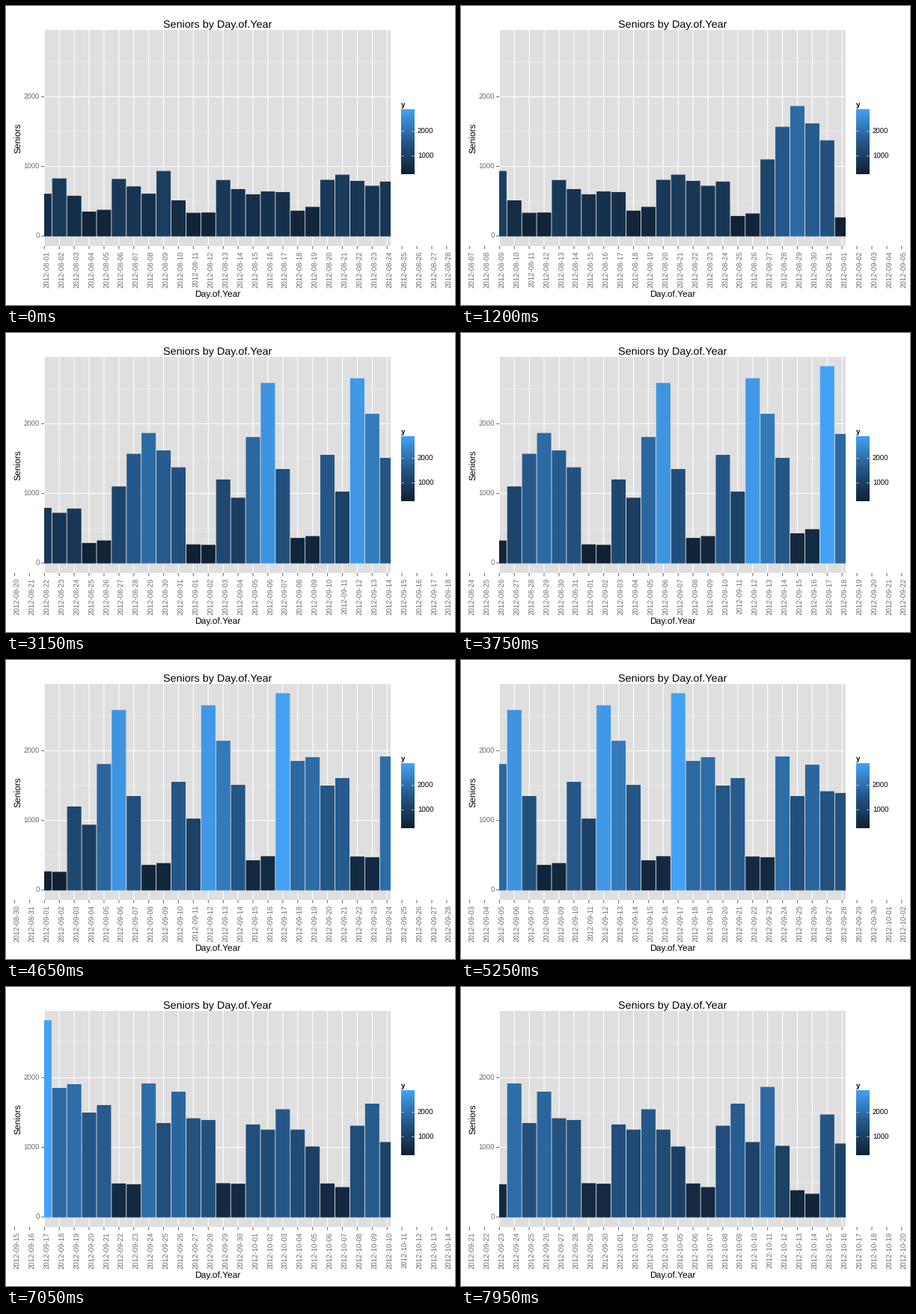
Animation of 600x400 px, one loop 8000 ms. Source, as a matplotlib script:

```python
import matplotlib.pyplot as plt
import numpy as np
from matplotlib.animation import FuncAnimation
from matplotlib.colors import LinearSegmentedColormap, Normalize
from matplotlib.patches import Rectangle

plt.rcParams.update({"font.family": "Liberation Sans", "text.hinting": "none"})

W, H, DPI = 600, 400, 100
PX = 72 / DPI                                 # points per pixel
LEFT, RIGHT, TOP, BOTTOM = 51.3, 514, 32, 321
ZERO, UNIT = 307.8, 0.0932                    # baseline and pixels per senior
STEP = 19.91                                  # pixels per day
VISIBLE, BEFORE, AFTER = 24, 2, 27            # bars shown, labels either side
FRAMES, INTERVAL, FRAMES_PER_DAY = 160, 50, 3
GREY, PANEL = "#6d6d6d", "#dfdfdf"

COUNTS = [
    602, 822, 573, 346, 372, 814, 707, 603, 929, 507, 329, 332, 799, 669, 594,
    635, 626, 359, 414, 802, 876, 787, 716, 777, 283, 319, 1094, 1563, 1862,
    1611, 1369,
    263, 256, 1194, 932, 1803, 2580, 1344, 355, 382, 1548, 1020, 2647, 2137,
    1504, 422, 481, 2820, 1848, 1902, 1494, 1602, 477, 466, 1912, 1344, 1794,
    1413, 1388, 481, 473,
    1324, 1250, 1542, 1250, 1007, 477, 425, 1306, 1622, 1071, 1863, 1017, 380,
    329, 1467, 1050,
]
DATES = np.datetime64("2012-08-01") + np.arange(len(COUNTS) + AFTER)
BLUES = LinearSegmentedColormap.from_list("blues", ["#102134", "#245788", "#44a2f5"])
scale = Normalize(min(COUNTS), max(COUNTS))

fig = plt.figure(figsize=(W / DPI, H / DPI), dpi=DPI, facecolor="white")
ax = fig.add_axes([0, 0, 1, 1])


def line(xs, ys, color, width=1.07, **kw):
    return ax.plot(xs, ys, color=color, lw=width * PX, snap=False,
                   solid_capstyle="butt", **kw)[0]


def text(x, y, s, size=9.6, color="black", **kw):
    return ax.text(x, y, s, fontsize=size * PX, color=color, va="baseline",
                   rotation_mode="anchor", **kw)


def y_pos(value):
    return ZERO - value * UNIT


# Panel and grid
panel = ax.add_patch(Rectangle((LEFT, TOP), RIGHT - LEFT, BOTTOM - TOP,
                               fc=PANEL, lw=0, snap=False, zorder=0))
for value in (500, 1500, 2500):
    line([LEFT, RIGHT], [y_pos(value)] * 2, "#efefef", 0.53, zorder=1)
for value in (0, 1000, 2000):
    y = y_pos(value)
    line([LEFT, RIGHT], [y, y], "white", zorder=1)
    line([LEFT - 4.3, LEFT], [y, y], GREY)
    text(44.6, y + 3.5, str(value), color=GREY, ha="right")
for k in range(VISIBLE):
    x = LEFT + k * STEP
    line([x, x], [TOP, BOTTOM], "white", zorder=1).set_clip_path(panel)

# Bars
bars = []
for k in range(VISIBLE):
    bar = Rectangle((LEFT + (k - 0.45) * STEP, ZERO), 0.9 * STEP, 0,
                    lw=1.07 * PX, joinstyle="round", snap=False, zorder=2)
    ax.add_patch(bar).set_clip_path(panel)
    bars.append(bar)

# Day ticks and labels
days = []
for offset in range(-BEFORE, AFTER + 1):
    x = LEFT + offset * STEP
    tick = line([x, x], [BOTTOM, BOTTOM + 4.3], GREY)
    label = text(x + 7, 327.8, "", color=GREY, rotation=90, ha="right")
    days.append((offset, tick, label))

# Titles
text(282.6, 28.7, "Seniors by Day.of.Year", 14.4, ha="center")
text(282.6, 390, "Day.of.Year", 12, ha="center")
text(19.5, 176.7, "Seniors", 12, rotation=90, ha="center")

# Colour key
KEY_L, KEY_R, KEY_T, KEY_B = 528.3, 545.6, 138.8, 225.2
ax.imshow(np.linspace(1, 0, 256)[:, None], cmap=BLUES, aspect="auto",
          extent=(KEY_L, KEY_R, KEY_B, KEY_T), interpolation="bilinear")
text(528, 134.8, "y", weight="bold")
for value, y in ((2000, 167.8), (1000, 200.5)):
    for x in (KEY_L, KEY_R - 3.5):
        line([x, x + 3.5], [y, y], "white", 0.6)
    text(549.8, y + 3.5, str(value))

ax.set(xlim=(0, W), ylim=(H, 0))
ax.axis("off")


def update(frame):
    first = frame // FRAMES_PER_DAY
    for bar, count in zip(bars, COUNTS[first:first + VISIBLE]):
        bar.set_height(-count * UNIT)
        bar.set_color(BLUES(scale(count)))
    for offset, tick, label in days:
        day = first + offset
        tick.set_visible(day >= 0)
        label.set_text(str(DATES[day]) if day >= 0 else "")
    return bars


anim = FuncAnimation(fig, update, frames=FRAMES, interval=INTERVAL,
                     repeat=True, repeat_delay=0, blit=False)
plt.show()
```
